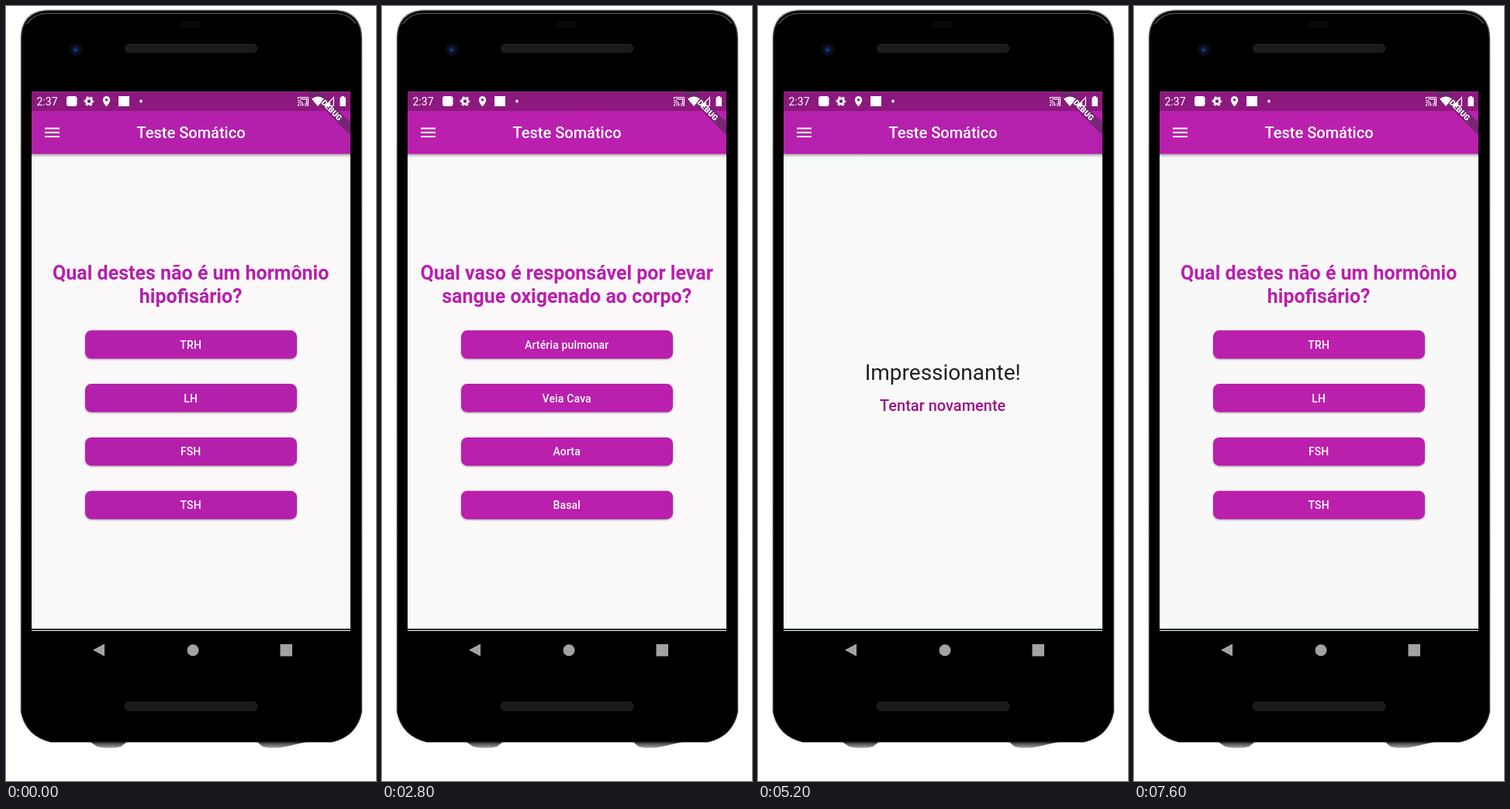
Write an HTML page that moves like this. It is 477x997 px and loops after 8000 ms.

```html
<!DOCTYPE html>
<html lang="pt">
<head>
<meta charset="utf-8">
<style>
html, body { margin: 0; width: 100%; height: 100%; overflow: hidden; background: #fff; }
svg { display: block; width: 100%; height: 100%; font-family: Roboto, sans-serif; --main: #b420ab; }
text { text-anchor: middle; }
.main { fill: var(--main); }
.ask { font-size: 25px; font-weight: 700; }
.label { font-size: 14px; font-weight: 500; letter-spacing: .15px; fill: #fff; }
.button { filter: drop-shadow(0 1.5px 1.2px #0005); }
.button.down { fill: #c63cbd; filter: drop-shadow(0 4px 4px #0006); }
.icons { fill: #fff; }
.line { fill: none; stroke: #fff; }
</style>
</head>
<body>
<svg viewBox="0 0 477 997">
  <defs>
    <linearGradient id="rim" x2="0" y2="1">
      <stop offset="0" stop-color="#777"/><stop offset=".04" stop-color="#555"/>
      <stop offset=".95" stop-color="#444"/><stop offset="1" stop-color="#111"/>
    </linearGradient>
    <linearGradient id="foot" x2="0" y2="1">
      <stop offset="0" stop-color="#111"/><stop offset="1" stop-color="#aaa"/>
    </linearGradient>
    <linearGradient id="shade" x2="0" y2="1">
      <stop offset="0" stop-opacity=".28"/><stop offset="1" stop-opacity="0"/>
    </linearGradient>
    <clipPath id="screen"><path d="M33 110.5H444V803H33z"/></clipPath>
    <clipPath id="tap"><rect id="tapBox" x="102" width="273" height="36.5" rx="8"/></clipPath>
  </defs>

  <path fill="url(#foot)" d="M106 945H158L148 953Q134 956 118 953zM322 945H396Q372 950 360 953Q344 956 331 953z"/>
  <path fill="#000" stroke="url(#rim)" stroke-width="1.4" d="M52 5.5H426Q458.500 8 458.500 42V908Q452 939 420 946.500H58Q26 939 19.500 908V42Q19.500 8 52 5.500z"/>
  <path fill="none" stroke="#666" stroke-width="1.2" d="M27 23Q36 9.500 54 9.500H424Q442 9.500 451 23"/>
  <rect x="225" y="20" width="26" height="9" rx="3" fill="#080808"/>
  <g fill="#1a1a1a" stroke="#262626">
    <rect x="153.500" y="49.500" width="170" height="10" rx="4.500"/>
    <rect x="153.500" y="895.500" width="170" height="11" rx="4.500"/>
  </g>
  <circle cx="90" cy="56" r="8.500" fill="#0b0c14"/>
  <circle cx="90" cy="56" r="4.500" fill="#0c1a42"/>
  <circle cx="89.500" cy="56.500" r="1.500" fill="#24479a"/>

  <g clip-path="url(#screen)">
    <rect id="page" x="33" y="110" width="411" height="692"/>
    <g id="body"></g>
    <path class="main" d="M33 110H444V190.500H33z"/>
    <path fill="#8d187e" d="M33 110H444V135H33z"/>
    <path fill="url(#shade)" d="M33 190.500H444V195H33z"/>
    <g transform="translate(444 110) rotate(45)">
      <path fill="#6b286b" opacity=".85" d="M-40 28H40V40H-40z"/>
      <text y="37.600" font-size="10.200" font-weight="900" fill="#fff">DEBUG</text>
    </g>
    <path fill="#1d2c2c" d="M33 801H444V803H33z"/>
  </g>
  <path fill="#eee" d="M33 803H444V804H33z"/>

  <g class="icons">
    <text x="53" y="127.500" font-size="14">2:37</text>
    <rect x="78" y="116" width="13.500" height="13" rx="3"/>
    <circle class="line" cx="107" cy="122.500" r="3.600" stroke-width="2.800"/>
    <circle class="line" cx="107" cy="122.500" r="5.400" stroke-width="2" stroke-dasharray="2.800 2.855" stroke-dashoffset="1.400"/>
    <path fill-rule="evenodd" d="M129.500 116a4.700 4.700 0 0 1 4.700 4.700q0 3.300-4.700 8.800q-4.700-5.500-4.700-8.800a4.700 4.700 0 0 1 4.700-4.700m0 3a1.700 1.700 0 1 0 .01 0z"/>
    <rect x="145" y="116" width="14" height="13"/>
    <circle cx="174" cy="122.500" r="1.900"/>
    <path class="line" stroke-width="1.200" d="M376.500 119.500V117.500H389.500V128H385M376 121.500a7 7 0 0 1 7 7M376 124a4.500 4.500 0 0 1 4.500 4.500M379 119.700H387.500V126H385"/>
    <circle cx="377" cy="127.600" r="1.200"/>
    <path d="M394 119.500Q402 113.500 410 119.500L402 129z"/>
    <path class="line" stroke-width="1.200" d="M412 128.400L422.400 117.500V128.400z"/>
    <path d="M411 129L418 121.500V129z"/>
    <path d="M430.500 117.500H432.500V116H436V117.500H438V129H430.500z"/>
    <path d="M50 156.500H69V158.500H50zM50 161.800H69V163.800H50zM50 167H69V169H50z"/>
    <text x="238.500" y="170" font-size="20" font-weight="500">Teste Somático</text>
  </g>

  <g fill="#a2a2a2">
    <path d="M112 828.500L127 820.500V836.500z"/>
    <circle cx="241" cy="828.700" r="7.500"/>
    <rect x="353.500" y="821" width="15.500" height="15.500"/>
  </g>
</svg>
<script>
const $ = id => document.getElementById(id);
const text = (y, cls, s) => `<text x="238.2" y="${y}" class="${cls}">${s}</text>`;

function quiz(lines, answers, pressed) {
  const top = i => 417.3 + i * 68.8;
  return lines.map((s, i) => text(352.3 + i * 29.3, "ask main", s)).join("") +
    answers.map((s, i) => {
      const down = i === pressed;
      if (down) $("tapBox").setAttribute("y", top(i));
      return `<rect class="button main ${down ? "down" : ""}" x="102" y="${top(i)}" width="273" height="36.5" rx="8"/>` +
        (down ? `<circle cx="238.5" cy="${top(i) + 14.5}" r="21" fill="#ff55f2" clip-path="url(#tap)"/>` : "") +
        text(top(i) + 23.5, "label", s);
    }).join("");
}

const hormone = pressed => quiz(["Qual destes não é um hormônio", "hipofisário?"],
  ["TRH", "LH", "FSH", "TSH"], pressed);
const vessel = pressed => quiz(["Qual vaso é responsável por levar", "sangue oxigenado ao corpo?"],
  ["Artéria pulmonar", "Veia Cava", "Aorta", "Basal"], pressed);
const result = pressed =>
  (pressed ? `<rect x="140" y="495" width="197" height="36" fill="#f3e8f3"/>
    <circle cx="237" cy="515" r="9" fill="#e6d0e6"/>` : "") +
  `<g font-size="28" fill="#212121">${text(481.3, "", "Impressionante!")}</g>
   <g font-size="20" font-weight="500" fill="#9e1386">${text(520.7, "", "Tentar novamente")}</g>`;

// start time, view, pressed item, page colour, main colour
const scenes = [
  [0, hormone, null, "#faf8f9", "#b420ab"],
  [800, hormone, null, "#faf8f9", "#ba1fae"],
  [2000, hormone, 0, "#f8f8f8", "#b120aa"],
  [2400, vessel, null, "#faf8f9", "#ba1fae"],
  [4800, vessel, 2, "#faf8f9", "#ba1fae"],
  [5200, result, null, "#f8faf9", "#b520ad"],
  [6400, result, true, "#f8f8f8", "#b520ad"],
  [6800, hormone, null, "#f8f8f8", "#bb20ac"]
];

let shown;
function draw(now) {
  const t = now % 8000;
  const scene = scenes.findLast(s => s[0] <= t);
  if (scene !== shown) {
    const [, view, pressed, page, main] = shown = scene;
    $("page").setAttribute("fill", page);
    document.querySelector("svg").style.setProperty("--main", main);
    $("body").innerHTML = view(pressed);
  }
  requestAnimationFrame(draw);
}
draw(performance.now());
</script>
</body>
</html>
```
